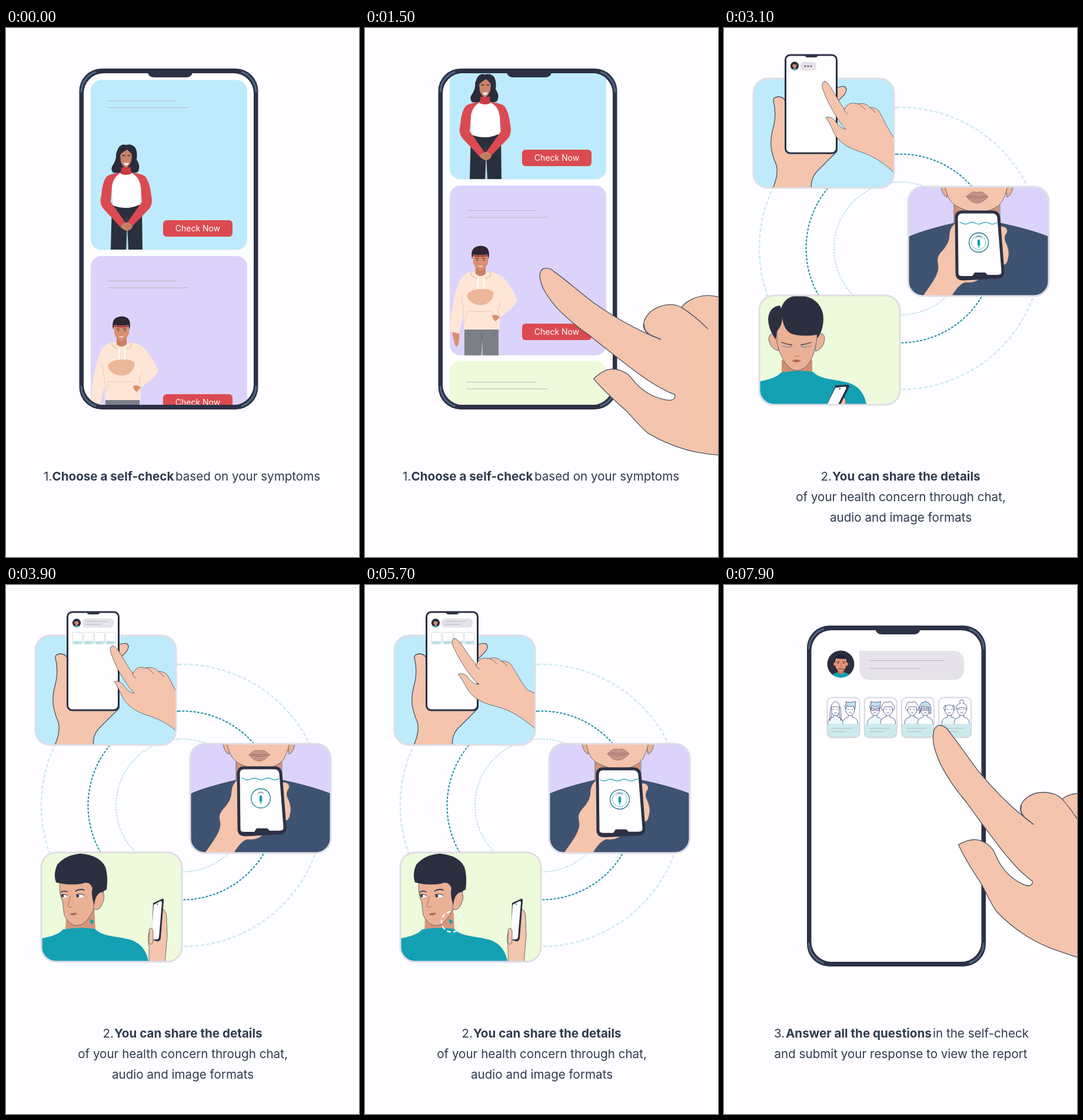
Write an HTML page that moves like this. It is 600 px wide and 900 px high and loops after 8000 ms.

```html
<!DOCTYPE html>
<html lang="en">
<head>
<meta charset="utf-8">
<title>Self-check in three steps</title>
<style>
  html, body { margin: 0; width: 100%; height: 100%; overflow: hidden; background: #fefdff; }
  svg { display: block; width: 600px; height: 900px; font-family: Poppins, Inter, "Open Sans", sans-serif; }
  .cap { font-size: 20.6px; fill: #2f3b4e; }
  .cap .b { font-size: 20.6px; font-weight: 700; }
  .skin { fill: #f4c4ac; stroke: #4a5268; stroke-width: 1.3; stroke-linejoin: round; stroke-linecap: round; }
  .face { fill: #eab195; }
  .fine { stroke-width: .8; }
  .line { fill: none; stroke: #4a5268; stroke-width: 1.3; stroke-linecap: round; }
  .line.fine { stroke-width: .8; }
  .rule { stroke: #b9b3bd; stroke-width: 1; }
</style>
</head>
<body>
<svg id="stage" viewBox="0 0 600 900"></svg>
<script>
const INK = '#2d3145', TEAL = '#13a0b3', RED = '#db4a50', GREY = '#e5e2e9';
const LOOP = 8000, CUT2 = 2200, CUT3 = 5900;

const box = (x, y, w, h, r, fill, more = '') =>
  `<rect x="${x}" y="${y}" width="${w}" height="${h}" rx="${r}" fill="${fill}" ${more}/>`;
const path = (d, fill, more = '') => `<path d="${d}" fill="${fill}" ${more}/>`;
const skin = (d, kind = '') => `<path class="skin ${kind}" d="${d}"/>`;
const line = (d, kind = '') => `<path class="line ${kind}" d="${d}"/>`;
const dot = (x, y, r, fill, more = '') => `<circle cx="${x}" cy="${y}" r="${r}" fill="${fill}" ${more}/>`;
const oval = (x, y, a, b, fill) => `<ellipse cx="${x}" cy="${y}" rx="${a}" ry="${b}" fill="${fill}"/>`;
const rule = (x1, x2, y) => `<path class="rule" d="M${x1} ${y}H${x2}"/>`;
const group = (id, body) => `<g id="${id}">${body}</g>`;
const stroke = (d, color, w) =>
  path(d, 'none', `stroke="${color}" stroke-width="${w}" stroke-linecap="round" stroke-linejoin="round"`);

// Large phone, open screen
const phone = body => box(124.5, 69, 304, 580, 38, INK)
  + stroke('M128 108A36 36 0 0 1 152 75M401 75A36 36 0 0 1 425 108M425 610A36 36 0 0 1 401 643M152 643A36 36 0 0 1 128 610', '#4d6784', 3)
  + box(132, 77, 289, 564, 34, '#fffefe')
  + `<g clip-path="url(#screen)">${body}</g>`
  + path('M241 76H317Q315 84 306 84H252Q243 84 241 76Z', INK);

// Pointing hand; the origin is the fingertip
const bigHand = skin(`M0 0C-8 0-12 8-10 17C-8 34 4 50 17 66C36 86 56 102 75 115C96 132 116 148 137 164C168 188 194 206 219 215
  C221 224 213 226 204 224C180 220 160 206 147 189C138 176 122 170 108 172C96 174 88 182 81 188
  C98 209 118 226 137 243C152 259 162 272 174 281C206 300 242 312 274 316C300 319 340 320 376 322
  L620 350V110L344 90C326 70 314 56 307 59C296 44 266 42 242 56C236 60 232 64 231 67
  C214 57 182 62 169 85C162 98 167 108 176 113L195 121C150 104 110 79 80 58C54 38 30 17 14 6C10 2 5 0 0 0Z`)
  + line('M167 96Q166 108 180 115L195 121M231 67Q254 82 275 103M300 60L306 56');

const woman = path('M190 206Q195 196 204 199Q214 196 220 204Q224 212 222 224Q230 236 224 245Q213 250 206 240Q196 249 182 246Q176 240 183 231Q188 222 187 214Z', '#2a2c3c')
  + path('M194 213Q196 204 204 204Q213 205 214 214L213 226Q209 236 204 238Q198 236 195 227Z', '#c98468')
  + path('M193 217Q194 204 203 203Q214 204 215 217Q211 211 206 207Q198 211 193 217Z', '#2a2c3c')
  + stroke('M198 217h4M207 217h4', '#2a2c3c', 1.4) + path('M200 229Q204 231 209 229Q207 234 204 234Q201 233 200 229Z', '#fff')
  + path('M180 301L178 377H204L206 335L208 377H232L231 301Z', '#2a2f3e') + stroke('M205 322V376M188 308L186 320M222 308L224 320', '#69707d', .7)
  + path('M189 248Q204 243 220 248L230 268L228 300Q206 311 182 302L179 268Z', '#fff')
  + path('M196 237H212L213 248Q204 252 195 248Z', '#c93c43')
  + path('M196 246Q182 253 180 270L178 296L203 331L196 340L166 308Q158 299 162 285Q164 260 172 252Q180 247 196 246Z', RED)
  + path('M212 246Q227 253 229 270L231 296L206 331L212 340L243 308Q250 300 247 285Q244 260 236 252Q228 247 212 246Z', RED)
  + path('M197 335Q203 329 211 332L215 338Q212 345 205 345Q199 343 195 339Z', '#c98468') + stroke('M200 336L210 342M204 334L212 339', '#8f5341', .6);

const man = path('M169 630H227V677H200L199 650L197 677H169Z', '#7c8087') + stroke('M198 640V676M174 637L180 646M222 637L216 646', '#5c6068', .8)
  + path('M148 636L160 638Q162 650 157 662L153 660L150 648Z', '#d9906f')
  + path('M181 533Q167 539 161 549Q152 570 146 610L144 636L160 640L168 606V633H229V612Q258 592 259 582Q250 562 237 546Q228 538 212 534Q196 545 181 533Z', '#fde6d6')
  + path('M188 524H205V538Q196 546 188 538Z', '#ca7f63')
  + path('M183 504Q184 496 196 496Q209 496 210 504L209 520Q205 530 196 533Q188 530 184 520Z', '#d98e71')
  + path('M182 513Q179 498 187 493Q197 488 206 493Q213 498 210 513L208 505Q196 508 184 505Z', '#2e2631')
  + stroke('M184 507Q196 510 208 507', '#a8353f', 2)
  + stroke('M188 512h5M199 512h5', '#3a2a2e', 1.2) + dot(191, 515, 1, '#2a2630') + dot(202, 515, 1, '#2a2630') + path('M191 524Q196 526 201 524Q197 529 191 524Z', '#fff')
  + stroke('M181 533Q176 542 192 547M212 534Q218 542 203 547', '#ecc9b4', 2) + stroke('M192 546V563M203 546L201 566', '#fff', 2)
  + path('M173 574Q178 565 196 564Q214 563 219 570Q218 584 205 590Q194 594 183 588Q174 583 173 574Z', '#ebb799')
  + stroke('M168 606L164 574M229 612Q222 600 232 585M174 602H215L224 624M174 602L169 622', '#ecc9b4', 1)
  + path('M216 609Q224 606 229 612L222 619Q217 616 216 609Z', '#d9906f');

const listCard = (y, fill, rules, who, btn) => box(144, y, 266, 289, 18, fill)
  + rule(172.5, 290, y + rules + .5) + rule(172.5, 310, y + rules + 12)
  + who + (btn ? box(267, btn, 118, 28, 6, RED)
  + `<text x="326" y="${btn + 19}" font-size="14" fill="#fff" text-anchor="middle">Check Now</text>` : '');

const scene1 = phone(group('list',
    listCard(88.5, '#bdebfd', 35, woman, 327) + listCard(388, '#dcd3fc', 42, man, 623) + listCard(687, '#edfadb', 35, '', 0)))
  + `<text class="cap" y="769.500"><tspan x="64">1.</tspan><tspan class="b" x="78.500">Choose a self-check</tspan><tspan x="288">based on your symptoms</tspan></text>`
  + group('hand1', bigHand);

const avatar = dot(0, 0, 23, '#2b2e40')
  + `<g clip-path="url(#face)">${path('M-16 24Q-15 15-4 14H5Q15 15 17 24Z', TEAL)}</g>`
  + path('M-5 8H5V15Q0 19-5 15Z', '#c9755c')
  + path('M-10-9Q0-13 10-9L9 4Q6 12 0 13Q-7 11-9 4Z', '#e39378')
  + oval(-10.5, 0, 1.6, 3, '#e39378') + oval(10.5, 0, 1.6, 3, '#e39378')
  + path('M-11-3Q-13-15-2-16Q13-17 11-3L9-9Q-1-8-8-10Z', '#22242f')
  + stroke('M-7-4h5M3-4h5M-3 8Q0 9 4 8', '#5d2f30', 1.1) + stroke('M0-1V4H2', '#b96350', .8)
  + dot(-4.5, -1.5, 1, '#33222a') + dot(5, -1.5, 1, '#33222a');

// Frame of one illustration tile
const tile = (x, y, fill, art, clip) => box(x, y, 239, 186, 25, fill) + `<g clip-path="url(#${clip})">${art}</g>`
  + box(x, y, 239, 186, 25, 'none', 'stroke="#e0dde7" stroke-width="3"');

const mini = x => box(x, 80.5, 17, 20, 2, '#fff', 'stroke="#d3d3de" stroke-width=".8"')
  + box(x + .4, 95, 16.2, 5.4, 1, '#c9ebef') + stroke(`M${x + 3} 97h11M${x + 3} 99h8`, '#9ba6b2', .5);

const chatArt = skin('M190 103Q198 98 206 100Q211 106 204 114L190 128Z')
  + skin('M104 124Q101 117 92 117Q83 118 84 124C88 140 88 155 83 172C76 198 82 214 86 226Q96 244 82 275H149Q146 258 157 245Q176 226 192 210V124Z')
  + box(104.5, 46, 87, 167, 8, '#fffefe', `stroke="${INK}" stroke-width="3"`) + path('M137 46H160Q159 50 155 50H142Q138 50 137 46Z', INK)
  + `<g transform="translate(120 64.500) scale(.31)">${avatar}</g>`
  + group('typing1', box(130, 57.5, 27, 15, 6, GREY) + dot(138, 65, 1.5, '#5a4f78') + dot(143, 65, 1.5, '#3e6c8a') + dot(148, 65, 1.5, '#b1445d'))
  + group('reply1', box(130, 57, 53, 15.5, 6, GREY) + rule(135, 173, 62) + rule(135, 162, 67) + [113, 132, 150.5, 169].map(mini).join(''))
  + group('hand2', skin(`M171 91C166 91 166 98 168 104C176 128 190 150 199 163L207 172Q198 171 191 161Q184 149 173 152
      C182 165 185 176 190 184C200 198 216 206 236 212C258 220 274 232 290 247L340 290V215L289 187C278 172 273 158 266 146Q262 135 248 135Q240 126 227 129Q211 124 205 138C192 122 184 102 177 95Q174 91 171 91Z`, 'fine')
    + line('M204 137Q204 143 210 146M228 129Q236 133 240 139M248 135Q254 139 257 144', 'fine'));

const voiceArt = skin('M368 262Q369 284 379 288L382 262ZM492 262Q491 284 481 288L478 262Z', 'face fine')
  + path('M391 290H468V340L430 356L391 345Z', '#d39379') + line('M391 298V335M469 300V335', 'fine')
  + skin('M375 260Q376 290 393 302Q416 314 432 313Q450 314 467 302Q480 290 483 260Z', 'fine')
  + group('lips', path('M-18 0Q-8-10-3-8Q0-6 3-8Q9-10 19 0Q9 11 0 11Q-9 11-18 0Z', '#c9938a', 'stroke="#8a5d59" stroke-width=".7"')
    + stroke('M-18 0Q-8-2 0 0Q8-2 19 0M-13 1Q0 5 13 1', '#8a5d59', .7))
  + path('M310 357Q335 345 391 332L432 364L470 332Q522 343 554 356V462H310Z', '#3e5372', 'stroke="#2c3c56" stroke-width=".8"')
  + skin('M395 330Q384 338 383 350Q384 366 368 382Q361 390 363 400C368 418 352 434 334 462H384Q398 436 410 433Q426 435 436 426L420 400L396 390Z', 'fine')
  + group('mic', skin('M470 337Q484 338 481 348Q476 354 478 362Q487 380 483 392Q482 402 474 404Z', 'fine')
    + path('M405 313H456Q466 313 467 323L474 413Q475 424 464 424L407 427Q396 427 396 417L395 323Q395 313 405 313Z', '#fffefe', `stroke="${INK}" stroke-width="5"`)
    + path('M396 417V424Q398 428 407 428L464 425Q474 424 474 415L472 417Q470 420 464 420H448L444 416H426L422 422H406Q398 422 396 417Z', INK)
    + '<path id="wave" fill="none" stroke="#13a0b3" stroke-width="1.200"/>'
    + dot(433, 365, 16.5, 'none', 'stroke="#246b85" stroke-width="1.300"')
    + '<circle id="pulse" cx="433" cy="365" fill="none" stroke="#65c3cd" stroke-width="1"/>'
    + box(430.8, 360, 4.5, 11, 2.2, TEAL) + stroke('M427 358Q433 350 439 358M429 355H437', '#64748a', .8) + stroke('M433 371V374', TEAL, 1.3));

const shirt = path('M97 586Q124 581 151 585C164 598 184 597 205 602Q238 608 243 645H56V602Q88 597 97 586Z', TEAL);
const headDown = path('M98 565H150V587Q124 592 98 587Z', '#cf8e71')
  + skin('M92 520Q76 516 76 530Q78 545 92 549ZM157 520Q172 516 171 530Q169 546 156 550Z', 'face fine')
  + skin('M90 492V535Q94 554 104 570Q114 583 124 583Q137 582 146 568Q158 548 159 510Z', 'face fine')
  + path('M88 530Q75 512 75 495Q76 475 95 472L97 477Q104 455 128 455Q160 457 168 485Q172 508 159 528L158 522Q130 526 114 520Q101 513 99 492Q99 506 90 516Z', '#2c2f40')
  + stroke('M98 535Q106 538 115 539M131 539Q140 538 148 535', '#2c2f40', 1.3)
  + stroke('M99 541Q107 544 116 542M131 542Q140 544 148 541', '#7d8c9c', 1.3) + stroke('M120 557Q124 561 128 557', '#b77358', 1)
  + path('M115 566Q123 562 131 566Q124 572 115 566Z', '#b2675a');
const headTurn = path('M102 566L150 546L152 586Q124 591 101 587Z', '#d6967a')
  + skin('M92 500L168 502L166 522L158 540L149 552Q144 564 136 572Q128 581 116 579Q106 576 99 562L96 538Q89 524 92 500Z', 'face fine')
  + skin('M151 530Q155 520 164 522Q170 530 163 544Q158 556 149 551Z', 'face fine')
  + path('M85 506Q80 492 87 476Q101 459 127 457Q160 460 169 480Q174 496 171 518L164 522Q152 524 150 545Q144 526 147 516Q142 503 130 508Q108 512 85 506Z', '#2c2f40')
  + stroke('M93 523Q98 519 104 522M118 521Q125 516 133 519', '#2c2f40', 1.5)
  + oval(99, 529, 5.5, 3, '#fff') + oval(126, 529, 6.5, 3, '#fff') + dot(96, 529, 2.4, '#38415a') + dot(122, 529, 2.5, '#38415a')
  + stroke('M93 527Q99 525 105 528M119 527Q126 524 133 528', '#2c2f40', 1)
  + stroke('M109 530Q107 541 105 545Q107 550 113 547', '#a76850', 1) + path('M108 560Q114 557 121 558Q116 565 108 560Z', '#ab655a')
  + path('M142 568L150 572L145 578Z', TEAL);
const photoArt = group('down', headDown) + group('turn', headTurn) + shirt
  + dot(147.5, 573, 17.5, 'none', 'id="spot" stroke="#fff" stroke-width="2.200" stroke-dasharray="7 4"')
  + group('camera', skin('M9-18Q16-18 16-2L17 28Q15 48 11 100H-16Q-12 54-15 36Q-16 20-10 14L0 28Z', 'fine')
    + path('M-7-29L8-36Q12-37 11-32L6 31Q5 37-1 36L-9 33Z', INK) + path('M-6-26L5-32Q8-33 8-30L3 29Q2 33-1 33L-10 33Z', '#fffefe')
    + dot(0, -27, 1, INK) + skin('M-13 15Q-8 11-7 20L-7 36Q-9 44-14 40Z', 'fine'));

const RINGS = [[240, '#cfebec', 2.6, '6 3.400'], [160.5, '#198fa3', 2, '4 2.400'], [113, '#a3d8dc', 1.4, '3 2']];
const ring = ([r, color, w, dash], i) => `<mask id="m${i}" maskUnits="userSpaceOnUse" x="0" y="0" width="600" height="900">
    <circle class="sweep" cx="300" cy="375" r="${r}" pathLength="100" fill="none" stroke="#fff" stroke-width="8" transform="rotate(${-90 - 400 / r} 300 375)"/></mask>
  <g mask="url(#m${i})">${dot(300, 375, r, 'none', `stroke="${color}" stroke-width="${w}" stroke-dasharray="${dash}" transform="rotate(${-90 - 400 / r} 300 375)"`)}</g>`;

const scene2 = RINGS.map(ring).join('')
  + group('t0', tile(50, 86, '#bdebfb', '', 'c0') + `<g clip-path="url(#c0)">${chatArt}</g>`)
  + group('t1', tile(313, 270, '#dcd3fc', voiceArt, 'c1'))
  + group('t2', tile(60, 455, '#edfadb', photoArt, 'c2'))
  + `<text class="cap" y="769.500"><tspan x="164.500">2.</tspan><tspan class="b" x="184">You can share the details</tspan></text>
  <g class="cap" text-anchor="middle"><text x="300.500" y="804.500">of your health concern through chat,</text><text x="300.500" y="840">audio and image formats</text></g>`;

// Line-art couples: [x, hair, glasses]
const hairs = {
  long: 'M-9 18Q-9-12 0-12Q9-12 9 18L6 10V-3Q0-6-6-3V10Z',
  spike: 'M-7 0Q-10-7-6-8L-7-12L0-11L9-12L8-8Q9-4 7 0L5-5Q-1-3-5-6Z',
  curly: 'M-8 2Q-13-2-9-6Q-8-13-1-11Q6-14 8-7Q13-3 8 2L6-4H-5Z',
  bob: 'M-9 7Q-11-12 0-12Q11-12 9 7L6 6V-3L-5-5Z',
  bald: 'M-8 1Q-10-4-6-7V0ZM8 1Q10-4 6-7V0Z',
  bun: 'M-8 0Q-9-9-2-9Q-5-15 0-15Q5-15 2-9Q9-9 8 0Q3-6-8 0Z'
};
const person = ([x, hair, specs], i) => `<g transform="translate(${x} 20) scale(1.080)" stroke="#474a80" stroke-width=".8" fill="${i ? '#fff' : '#eef8fb'}">
  <path d="M-12 24Q-13 14-3 12V8H3V12Q13 14 12 24Z"/><path d="M-7-4Q0-10 7-4V3Q4 10 0 10Q-5 9-7 3Z" fill="#fff"/>
  <path d="${hairs[hair]}" fill="${specs || hair === 'spike' ? '#bfe3ee' : '#fff'}"/>
  <path d="M-4 0h2M2 0h2M-2 5Q0 7 2 5" fill="none"/>${specs ? '<path d="M-6-2H-1V2H-6ZM1-2H6V2H1Z" fill="none"/>' : ''}</g>`;
const couples = [
  [[14, 'long', 0], [39, 'spike', 0]], [[18, 'spike', 1], [40, 'curly', 0]],
  [[18, 'curly', 0], [40, 'bob', 1]], [[18, 'bald', 0], [39, 'bun', 0]]
].map((pair, i) => `<g transform="translate(${175.5 + i * 63.2} 191.500)">${box(0, 0, 55, 68, 8, '#fff')}
  <g clip-path="url(#thumb)">${pair.map(person).join('')}${box(0, 45, 55, 23, 0, '#cbeaee')}</g>
  ${box(0, 0, 55, 68, 8, 'none', 'stroke="#d6d4df" stroke-width="1.800"')}${rule(8, 43, 52.5)}${rule(8, 33, 58)}</g>`).join('');

const bubble = (w, h, r) => path(`M230 112H${230 + w - r}Q${230 + w} 112 ${230 + w} ${112 + r}V${112 + h - r}Q${230 + w} ${112 + h} ${230 + w - r} ${112 + h}H${230 + r}Q230 ${112 + h} 230 ${112 + h - r}Z`, GREY);
const scene3 = `<g transform="translate(16.500)">${phone('')}</g>`
  + `<g transform="translate(198.500 134.500)">${avatar}</g>`
  + group('typing3', bubble(88, 48, 20) + [256, 273, 290].map(x => dot(x, 136, 4.5, '#5a5f78', 'class="blink"')).join(''))
  + group('intro', bubble(186, 137.5, 8) + box(244.5, 127, 158.5, 67.5, 0, '#fffefe') + rule(252, 315, 151.5) + rule(252, 336, 159.5)
    + group('start', box(-44, -14, 88, 28, 14, TEAL) + '<text x="1.500" y="4" font-size="10.500" fill="#fff" text-anchor="middle">START</text>'))
  + group('ask', bubble(178, 49.5, 20) + rule(247, 374, 128.5) + rule(247, 334, 142) + couples)
  + `<text class="cap" y="769.500"><tspan x="85">3.</tspan><tspan class="b" x="105">Answer all the questions</tspan><tspan x="355">in the self-check</tspan></text>
  <text class="cap" x="300.500" y="805" text-anchor="middle">and submit your response to view the report</text>`
  + group('hand3', bigHand);

const clip = (id, ...r) => `<clipPath id="${id}">${box(...r, '#fff')}</clipPath>`;
const stage = document.getElementById('stage');
stage.innerHTML = `<defs>${clip('screen', 132, 77, 289, 564, 34)}${clip('face', -23, -23, 46, 46, 23)}${clip('thumb', 0, 0, 55, 68, 8)}
  ${clip('c0', 51, 20, 237, 251, 23)}${clip('c1', 314, 271, 237, 184, 23)}${clip('c2', 61, 456, 237, 184, 23)}</defs>`
  + group('s1', scene1) + group('s2', scene2) + group('s3', scene3);

const el = {};
stage.querySelectorAll('[id]').forEach(n => el[n.id] = n);
const sweeps = stage.querySelectorAll('.sweep'), blinks = stage.querySelectorAll('.blink');
const put = (id, x, y, turn = 0, size = 1) => el[id].setAttribute('transform', `translate(${x} ${y}) rotate(${turn}) scale(${size})`);
const show = (id, on) => el[id].style.display = on ? '' : 'none';
const fade = (id, a) => el[id].style.opacity = a;

// Eased values between rows of [time, ...values]
function at(t, rows) {
  if (t <= rows[0][0]) return rows[0].slice(1);
  for (let i = 1; i < rows.length; i++) if (t < rows[i][0]) {
    const [a, b] = [rows[i - 1], rows[i]], p = (t - a[0]) / (b[0] - a[0]), e = p * p * (3 - 2 * p);
    return a.slice(1).map((v, k) => v + (b[k + 1] - v) * e);
  }
  return rows[rows.length - 1].slice(1);
}

const SCROLL = [[450, 0], [900, -120]];
const HAND1 = [[100, 640, 470], [450, 312, 478], [900, 293, 377], [1200, 293, 377], [1800, 322, 440], [1980, 332, 511], [2060, 330, 516], [2140, 332, 511]];
const HAND2 = [[3400, 0, 0, 0], [3800, 14, 14, 0], [4300, -19, 0, -4], [4900, -19, 0, -4], [5050, -18, 4, -4], [5200, -19, 0, -4]];
const HAND3 = [[7000, 660, 420, 15], [7300, 300, 224, 15], [7400, 297, 220, 15], [7500, 300, 226, 15], [7850, 370, 239, 15.3]];
const CAMERA = [[3300, 184, 645, 22, 1.25], [3900, 257, 570, 0, 1]];
const POPS = [[2450, 170, 180], [2550, 432, 363], [2650, 180, 548]];

function draw(t) {
  show('s1', t < CUT2); show('s2', t >= CUT2 && t < CUT3); show('s3', t >= CUT3);
  if (t < CUT2) {
    put('list', 0, at(t, SCROLL)[0]);
    put('hand1', ...at(t, HAND1));
  } else if (t < CUT3) {
    const [drawn] = at(t, [[2200, 0], [2300, 1.1], [2900, 101]]);
    sweeps.forEach(s => s.setAttribute('stroke-dasharray', `${drawn} 200`));
    POPS.forEach(([from, x, y], i) => {
      const [s] = at(t, [[from, 0], [from + 250, 1.04], [from + 350, 1]]);
      show('t' + i, s > 0);
      put('t' + i, x * (1 - s), y * (1 - s), 0, s);
    });
    show('typing1', t < 3500); show('reply1', t >= 3500);
    const [x, y, r] = at(t, HAND2);
    el.hand2.setAttribute('transform', `translate(${x} ${y}) rotate(${r} 171 91)`);
    const beat = (1 - Math.cos((t - 3100) * Math.PI / 320)) / 2;
    put('mic', 0, -4 * beat);
    put('lips', 430, 287 + 4 * beat, 0, 1 - .08 * beat);
    el.pulse.setAttribute('r', 12 + 8 * beat);
    let d = '';
    for (let i = 0; i <= 32; i++) d += (i ? 'L' : 'M') + (400 + i * 2) + ' ' + (332 + 1.6 * Math.sin(i * .55 + t / 130)).toFixed(2);
    el.wave.setAttribute('d', d);
    const [turn] = at(t, [[3400, 0], [3700, 1]]);
    fade('down', 1 - turn); fade('turn', turn);
    put('camera', ...at(t, CAMERA));
    fade('spot', at(t, [[4000, 0], [4200, 1]])[0]);
    el.spot.setAttribute('stroke-dashoffset', -t / 60);
  } else {
    show('typing3', t >= 6200 && t < 6600);
    blinks.forEach((b, i) => b.style.opacity = .65 + .35 * Math.sin(t / 90 - i));
    show('intro', t >= 6600 && t < 7550); show('ask', t >= 7550);
    put('start', 290, 222, 0, at(t, [[7380, 1], [7450, .94], [7530, 1]])[0]);
    show('hand3', t > 7020);
    put('hand3', ...at(t, HAND3));
  }
}

const begun = performance.now();
function tick() {
  draw((performance.now() - begun) % LOOP);
  requestAnimationFrame(tick);
}
tick();
</script>
</body>
</html>
```
